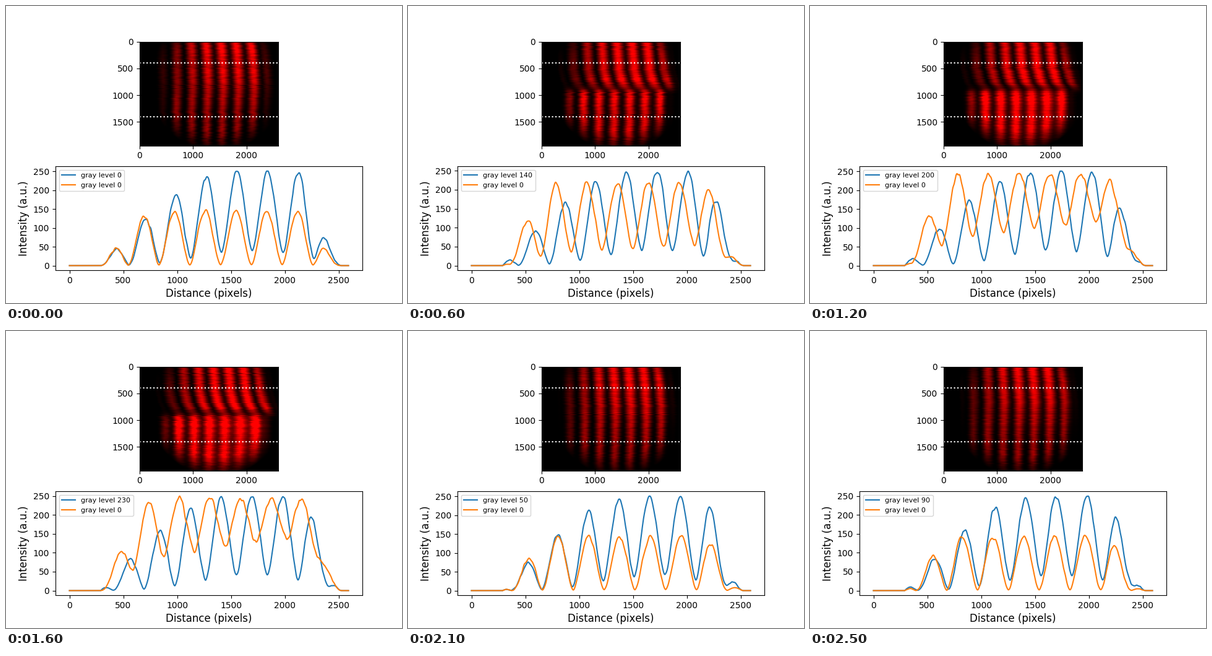
Animation of 640x480 px, one loop 2600 ms. Source, as a matplotlib script:

```python
import numpy as np
import matplotlib.pyplot as plt
from matplotlib.animation import FuncAnimation

plt.rcParams["text.kerning_factor"] = 6

WIDTH, HEIGHT = 2592, 1944
TOP_ROW, BOTTOM_ROW, SEAM = 400, 1400, 880
SPACING = 286

# Levels play in the order of their names, so 100 comes before 10.
LEVELS = sorted(range(0, 251, 10), key=lambda g: f"{g}_")

# The fringe pattern drifts with the level: position of its central minimum.
KEY_LEVELS = [0, 50, 90, 110, 160, 200, 250]
TOP_CENTRES = [1412, 1511, 1556, 1484, 1646, 1600, 1518]
BOTTOM_CENTRES = [1404, 1518, 1539, 1429, 1546, 1495, 1415]

x = np.arange(WIDTH)
cols = (np.arange(224) + 0.5) * WIDTH / 224
rows = (np.arange(168) + 0.5) * HEIGHT / 168


def ramp(values, start, end):
    """Quarter sine wave from 0 at start to 1 at end."""
    t = np.clip((values - start) / (end - start), 0, 1)
    return np.sin(np.pi / 2 * t)


def smooth_noise(rng, size, reach):
    bell = np.exp(-np.linspace(-2.5, 2.5, 2 * reach + 1) ** 2)
    noise = np.convolve(rng.normal(size=size), bell, "same")
    return noise / noise.std()


def fringes(centre, high, low, rng):
    wave = np.sin(np.pi * (x - centre) / SPACING) ** 2
    v = low + (high - low) * wave ** 0.85
    return np.clip(v + 0.2 * np.sqrt(v) * smooth_noise(rng, WIDTH, 28), 0, 251)


def top_profile(level, rng):
    high = 249 * ramp(x, 290, 1540) * ramp(x, 2530, 2130) ** 2
    low = np.minimum(high, 42 * np.exp(-((x - 1700) / 650) ** 2))
    return fringes(np.interp(level, KEY_LEVELS, TOP_CENTRES), high, low, rng)


def bottom_profile(level, rng):
    gain = np.interp(level, [90, 110, 160], [143, 180, 243])
    floor = np.interp(level, [90, 110, 160, 230], [0.015, 0.05, 0.3, 0.47])
    high = gain * ramp(x, 290, 820) ** 1.2 * ramp(x, 2530, 2130) ** 2
    low = high * floor * np.sqrt(x / 1400)
    return fringes(np.interp(level, KEY_LEVELS, BOTTOM_CENTRES), high, low, rng)


def bow(y):
    d = ((950 - y) / 950) ** 2
    return -(20 + 65 * cols / WIDTH) * (d if y < 950 else 0.3 * d)


def aperture(y):
    r2 = ((cols - 1450) ** 2 + (y - 750) ** 2) / 1260 ** 2
    return np.clip((1.05 - r2) / 0.5, 0, 1)


def vignette(y, row):
    return np.minimum(aperture(y) / np.maximum(aperture(row), 0.3), 1.25)


def camera(top, bottom, level, rng):
    split = np.interp(level, [90, 160], [0, 1])
    softness = np.interp(level, [90, 110], [230, 25])
    bottom = bottom * np.sqrt(bottom / bottom.max())
    gains = 1.02 + 0.07 * smooth_noise(rng, len(rows), 2)
    image = np.zeros((len(rows), len(cols), 3))
    for k, y in enumerate(rows):
        jitter = rng.normal(0, 9)
        lean = 125 * split * np.clip((y - TOP_ROW) / 450, 0, 1.1) ** 2
        upper = np.interp(cols - bow(y) + bow(TOP_ROW) - lean - jitter, x, top)
        lower = np.interp(cols - bow(y) + bow(BOTTOM_ROW) - jitter, x, bottom)
        upper *= vignette(y, TOP_ROW)
        lower *= vignette(y, BOTTOM_ROW)
        lower *= 1 + 0.2 * split * np.exp(-((y - 1070) / 130) ** 2)
        w = 1 / (1 + np.exp(-(y - SEAM) / softness))
        notch = 1 - 0.45 * split * np.exp(-((y - SEAM + 20) / 60) ** 2)
        light = (upper * (1 - w) + lower * w) * notch * gains[k]
        image[k, :, 0] = np.clip(light / 255, 0, 1)
    return image


fig, (ax_image, ax_plot) = plt.subplots(2, 1, figsize=(6.4, 4.8), dpi=100)


def draw(frame):
    level = LEVELS[frame]
    rng = np.random.default_rng(level)
    top, bottom = top_profile(level, rng), bottom_profile(level, rng)

    ax_image.clear()
    ax_image.imshow(camera(top, bottom, level, rng),
                    extent=(0, WIDTH, HEIGHT, 0))
    for y in (TOP_ROW, BOTTOM_ROW):
        ax_image.axhline(y, color="white", linestyle=":")

    ax_plot.clear()
    ax_plot.plot(x, top, label=f"gray level {level}")
    ax_plot.plot(x, bottom, label="gray level 0")
    ax_plot.set_xlabel("Distance (pixels)", fontsize=12)
    ax_plot.set_ylabel("Intensity (a.u.)", fontsize=12)
    ax_plot.legend(loc="upper left", fontsize=8)


anim = FuncAnimation(fig, draw, frames=len(LEVELS), interval=100,
                     init_func=lambda: draw(0), repeat=True, repeat_delay=0)
plt.show()
```
